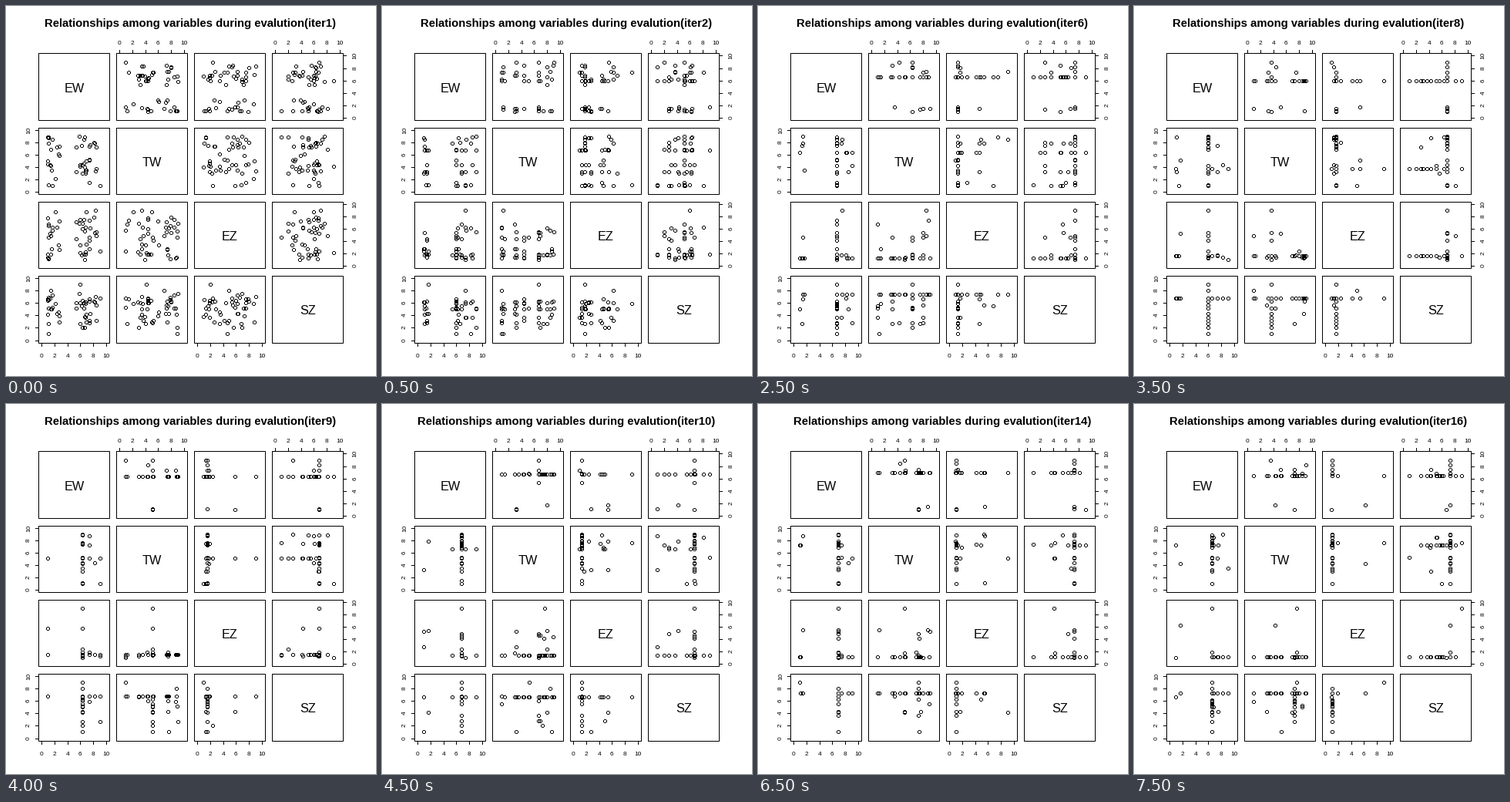
These frames come from a looping animation (480x480 px, 8000 ms). A matplotlib script:

```python
import numpy as np
import matplotlib.pyplot as plt
from matplotlib.animation import FuncAnimation
from matplotlib.path import Path

SIZE, GENS, STEP_MS, COUNT = 480, 16, 500, 48
NAMES = ["EW", "TW", "EZ", "SZ"]
LEFT, TOP, CELL_W, CELL_H = 42.77, 61.77, 100.99, 96.24
BOX_W, BOX_H = 91.49, 86.73

# Best individual at a few generations, one row per variable.
KEY_GENS = [4, 6, 8, 10, 14, 16]
BEST = [[6.0, 6.6, 5.9, 6.75, 6.9, 6.5],
        [6.7, 6.3, 3.7, 6.6, 7.2, 7.2],
        [1.8, 1.3, 1.7, 1.4, 1.1, 1.1],
        [5.1, 7.4, 6.8, 6.7, 7.3, 7.3]]
SPREAD = np.array([0.1, 0.5, 0.2, 0.28])  # lasting mutation rates

plt.rcParams["font.family"] = "Liberation Sans"


def px(v, col):
    """Pixel x of value v in a panel column."""
    return LEFT + col * CELL_W + (v + 0.4) * BOX_W / 10.8


def py(v, row):
    """Pixel y of value v in a panel row."""
    return TOP + row * CELL_H + BOX_H - (v + 0.4) * BOX_H / 10.8


def rescale(pts):
    lo, hi = pts.min(axis=0), pts.max(axis=0)
    return 1 + 8 * (pts - lo) / (hi - lo)


def first_population():
    """A uniform cloud whose EW values fall in two groups."""
    rng = np.random.default_rng(1)
    pts = rng.uniform(1, 9, (COUNT, 4))
    low = rng.random(COUNT) < 0.38
    pts[:, 0] = np.where(low, rng.uniform(1, 2.8, COUNT),
                         rng.normal(6.4, 1.1, COUNT))
    pts[:, 3] = rng.normal(4.6, 2, COUNT)
    return rescale(pts)


def evolve(gen, founders):
    """Converge on the best individual; some genes still vary."""
    rng = np.random.default_rng(gen)
    best = [np.interp(gen, KEY_GENS, row) for row in BEST]
    rate = SPREAD + (1 - SPREAD) * np.exp((1 - gen) / 3)
    pts = np.tile(best, (COUNT, 1))
    for k in range(4):
        genes = rng.choice(founders[:24, k], (2, COUNT))
        values = genes.min(axis=0) if k == 2 else genes[0]
        hit = np.flatnonzero(rng.random(COUNT) < rate[k])
        pts[hit, k] = values[hit]
        pts[rng.choice(COUNT, 2, replace=False), k] = 1, 9
    return pts


founders = first_population()
populations = [founders] + [evolve(g, founders) for g in range(2, GENS + 1)]

fig = plt.figure(figsize=(SIZE / 72, SIZE / 72), dpi=72, facecolor="white")
ax = fig.add_axes([0, 0, 1, 1])
ax.set_xlim(0, SIZE)
ax.set_ylim(SIZE, 0)
ax.axis("off")


def line(xs, ys):
    # Whole coordinates snap to the pixel they start.
    ax.plot(np.floor(xs), np.floor(ys), color="black", lw=1,
            solid_capstyle="projecting", solid_joinstyle="miter")


def label(x, y, text, size, **kw):
    return ax.text(x, y, text, size=size, ha="center", va="baseline",
                   rotation_mode="anchor", **kw)


def draw_axes():
    right, bottom = LEFT + 3 * CELL_W + BOX_W, TOP + 3 * CELL_H + BOX_H
    for i in range(4):
        odd = i % 2 == 1  # odd variables use the top and left sides
        for v in range(0, 11, 2):
            x, y = px(v, i), py(v, i)
            edge, out = (TOP, -4) if odd else (bottom, 4)
            line([x, x], [edge, edge + out])
            label(np.floor(x), 50.5 if odd else 455.5, str(v), 8.3)
            edge, out = (LEFT, -4) if odd else (right, 4)
            line([edge, edge + out], [y, y])
            label(31 if odd else 454.5, np.floor(y), str(v), 8.3, rotation=90)


def draw_panels():
    for row in range(4):
        for col in range(4):
            x0, y0 = LEFT + col * CELL_W, TOP + row * CELL_H
            x1, y1 = x0 + BOX_W, y0 + BOX_H
            line([x0, x1, x1, x0, x0], [y0, y0, y1, y1, y0])
        label(LEFT + row * CELL_W + BOX_W / 2, round(TOP + row * CELL_H + 50),
              NAMES[row], 16.3)


def pixel_ring():
    """A crisp 5 px ring built from four bars."""
    bars = [(-1, 1, 2, 2), (-1, -3, 2, -2), (-2, -2, -1, 1), (2, -2, 3, 1)]
    return Path.make_compound_path(*[
        Path([(a, b), (c, b), (c, d), (a, d), (a, b)], closed=True)
        for a, b, c, d in bars])


draw_panels()
draw_axes()
title = label(239, 27, "", 14.85, weight="bold")
dots, = ax.plot([], [], ls="none", marker=pixel_ring(), ms=6, mew=0,
                color="black")


def update(i):
    pts = populations[i]
    pairs = [(r, c) for r in range(4) for c in range(4) if r != c]
    xs = np.concatenate([px(pts[:, c], c) for r, c in pairs])
    ys = np.concatenate([py(pts[:, r], r) for r, c in pairs])
    dots.set_data(np.floor(xs), np.floor(ys))
    title.set_text(f"Relationships among variables during evalution(iter{i + 1})")
    return dots, title


anim = FuncAnimation(fig, update, frames=GENS, interval=STEP_MS,
                     init_func=lambda: update(0), repeat=True, repeat_delay=0)
plt.show()
```
